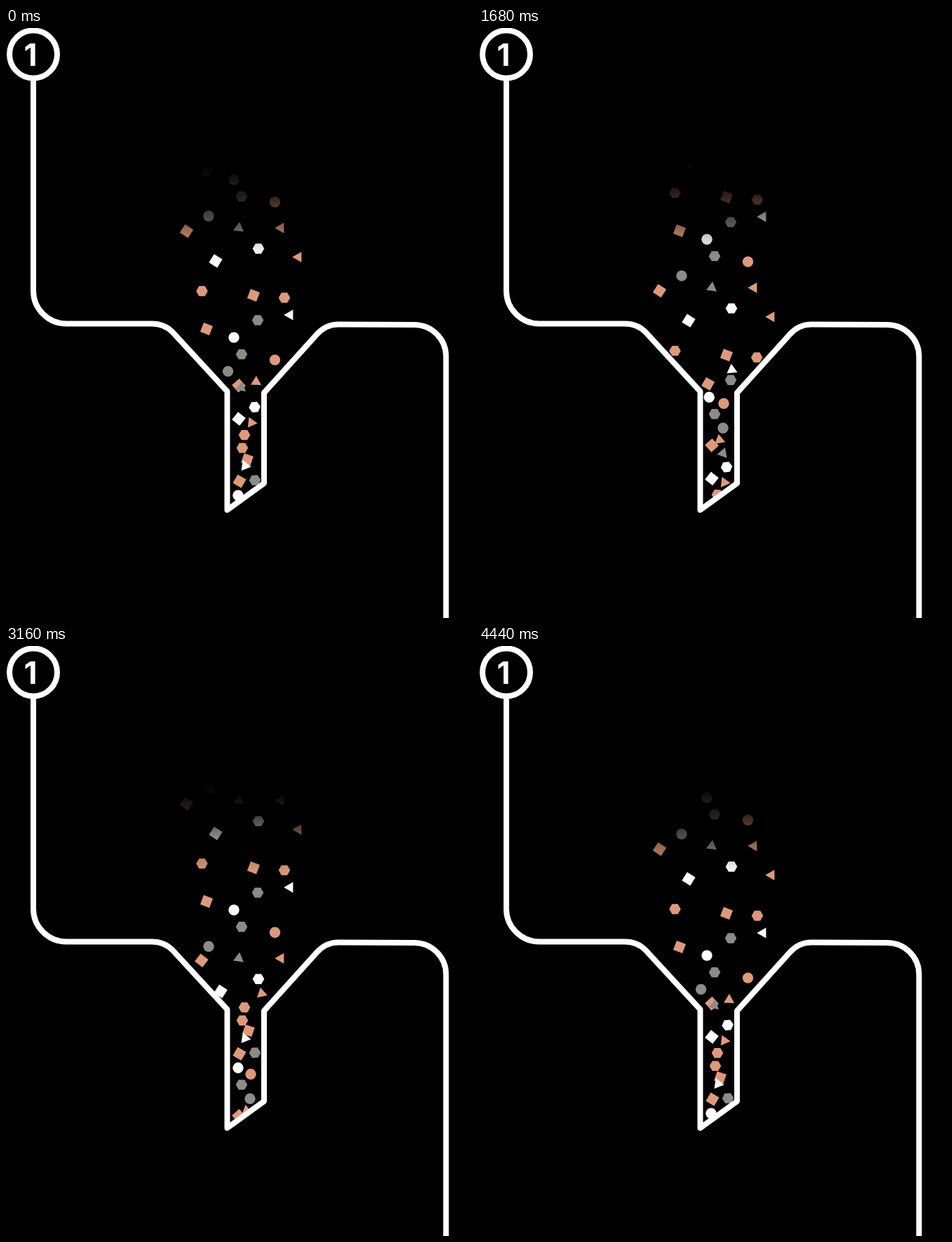
Write an HTML page with a canvas that moves like this. It is 666 by 841 pixels and loops after 4480 ms.

```html
<!DOCTYPE html>
<html lang="en">
<head>
<meta charset="utf-8">
<title>Funnel</title>
<style>
  html, body { margin: 0; width: 100%; height: 100%; overflow: hidden; background: #000; }
  canvas { display: block; }
</style>
</head>
<body>
<canvas id="stage" width="666" height="841" role="img" aria-label="1"></canvas>
<script>
const ctx = document.getElementById('stage').getContext('2d');
const LOOP = 4480, STEP = 40, CYCLE = LOOP - STEP;
const SPEED = 0.0507;   // px per ms
const SLIDE = 62;       // fall, in px, spent sliding from the wall into the spout
const ORANGE = '#df997a', GRAY = '#8b8b88', WHITE = '#fff';

// tilt: angle in free fall; roll: degrees turned per px of sideways slide
const CIRCLE = { sides: 0, r: 7.7, tilt: 0, roll: 0 };
const TRIANGLE = { sides: 3, r: 8.7, tilt: 60, roll: 0.8 };
const SQUARE = { sides: 4, r: 9.9, tilt: 66, roll: 0.2 };
const HEXAGON = { sides: 6, r: 8.3, tilt: 0, roll: 1 };

// x, y: place at time zero; lane: x in the spout; push: gain or loss in y
// from jostling in the neck.
const pieces = [];
function drop(kind, color, x, y, lane, push, tilt = kind.tilt) {
  pieces.push({ kind, color, x, y, lane, push, tilt });
}

drop(CIRCLE, WHITE, 325, 216, 331, 0);
drop(HEXAGON, GRAY, 336, 240, 336, 0);
drop(CIRCLE, ORANGE, 383.5, 248, 349, -23);
drop(CIRCLE, GRAY, 289, 268, 348, -8);
drop(SQUARE, ORANGE, 257.5, 289.5, 332, -5, 78);
drop(TRIANGLE, GRAY, 332, 285, 348, 11, -83);
drop(TRIANGLE, ORANGE, 392, 285, 343, -8);
drop(HEXAGON, WHITE, 360, 314.5, 353, 1);
drop(TRIANGLE, ORANGE, 417, 326.5, 350, 11);
drop(SQUARE, WHITE, 299, 332, 332, 0, 77);
drop(HEXAGON, ORANGE, 279.5, 375, 340, -20);
drop(SQUARE, ORANGE, 353, 381, 344, 9);
drop(HEXAGON, ORANGE, 397, 384.5, 337, -11);
drop(TRIANGLE, WHITE, 405, 409, 341, -10);
drop(HEXAGON, GRAY, 359, 416.5, 355, 3);
drop(SQUARE, ORANGE, 286, 429, 333, -8);

// Height of the centre of a piece at x when it meets the sloping wall.
function wallY(x) {
  const out = Math.max(315.5 - x, x - 368, 0);
  return 501 - out * 1.1;
}

function drawPiece({ kind, color, x, y, lane, push, tilt }, fallen) {
  const free = y + fallen;
  if (free < 180 || free > 710) return;
  const k = Math.min(1, Math.max(0, (free - wallY(x)) / SLIDE));
  const slid = 1 - (1 - k) ** 1.5;
  const shift = (lane - x) * slid;
  const cx = x + shift, cy = free + push * slid;
  const turn = (tilt + shift * kind.roll) * Math.PI / 180;

  ctx.fillStyle = color;
  ctx.beginPath();
  if (!kind.sides) ctx.arc(cx, cy, kind.r, 0, Math.PI * 2);
  for (let i = 0; i < kind.sides; i++) {
    const a = turn + i * Math.PI * 2 / kind.sides;
    ctx.lineTo(cx + kind.r * Math.cos(a), cy + kind.r * Math.sin(a));
  }
  ctx.fill();
}

const spout = new Path2D('M0 150H666V649H368L315.5 687H0Z');
const outline = new Path2D(
  'M39 73V375C39 400 60 421.5 86 421.5H208C220 421.5 230 425.5 238 434' +
  'L315.5 518V687L368 649V520L443 437C451 428 462 422.5 474 422.5' +
  'L582 423C607 423 627.5 443 627.5 468V850');

const shade = ctx.createLinearGradient(0, 190, 0, 325);
for (const [y, light] of [[190, 0], [215, 0.07], [240, 0.22], [300, 0.82], [325, 1]]) {
  shade.addColorStop((y - 190) / 135, `rgba(0,0,0,${1 - light})`);
}

function drawFrame() {
  ctx.strokeStyle = ctx.fillStyle = WHITE;
  ctx.lineWidth = 8;
  ctx.lineJoin = 'round';
  ctx.stroke(outline);
  ctx.beginPath();
  ctx.arc(39, 37.5, 34, 0, Math.PI * 2);
  ctx.stroke();
  ctx.font = '700 44px Inter, sans-serif';
  ctx.fillText('1', 42.5 - ctx.measureText('1').actualBoundingBoxRight, 54);
}

function draw(t) {
  ctx.fillStyle = '#000';
  ctx.fillRect(0, 0, 666, 841);
  ctx.save();
  ctx.clip(spout);
  for (const piece of pieces) {
    for (let lap = -1; lap <= 2; lap++) drawPiece(piece, (t + lap * CYCLE) * SPEED);
  }
  ctx.fillStyle = shade;
  ctx.fillRect(200, 150, 260, 175);
  ctx.restore();
  drawFrame();
}

const start = performance.now();
function tick() {
  const t = (performance.now() - start) % LOOP;
  draw(Math.floor(t / STEP) * STEP);
  requestAnimationFrame(tick);
}
tick();
</script>
</body>
</html>
```
